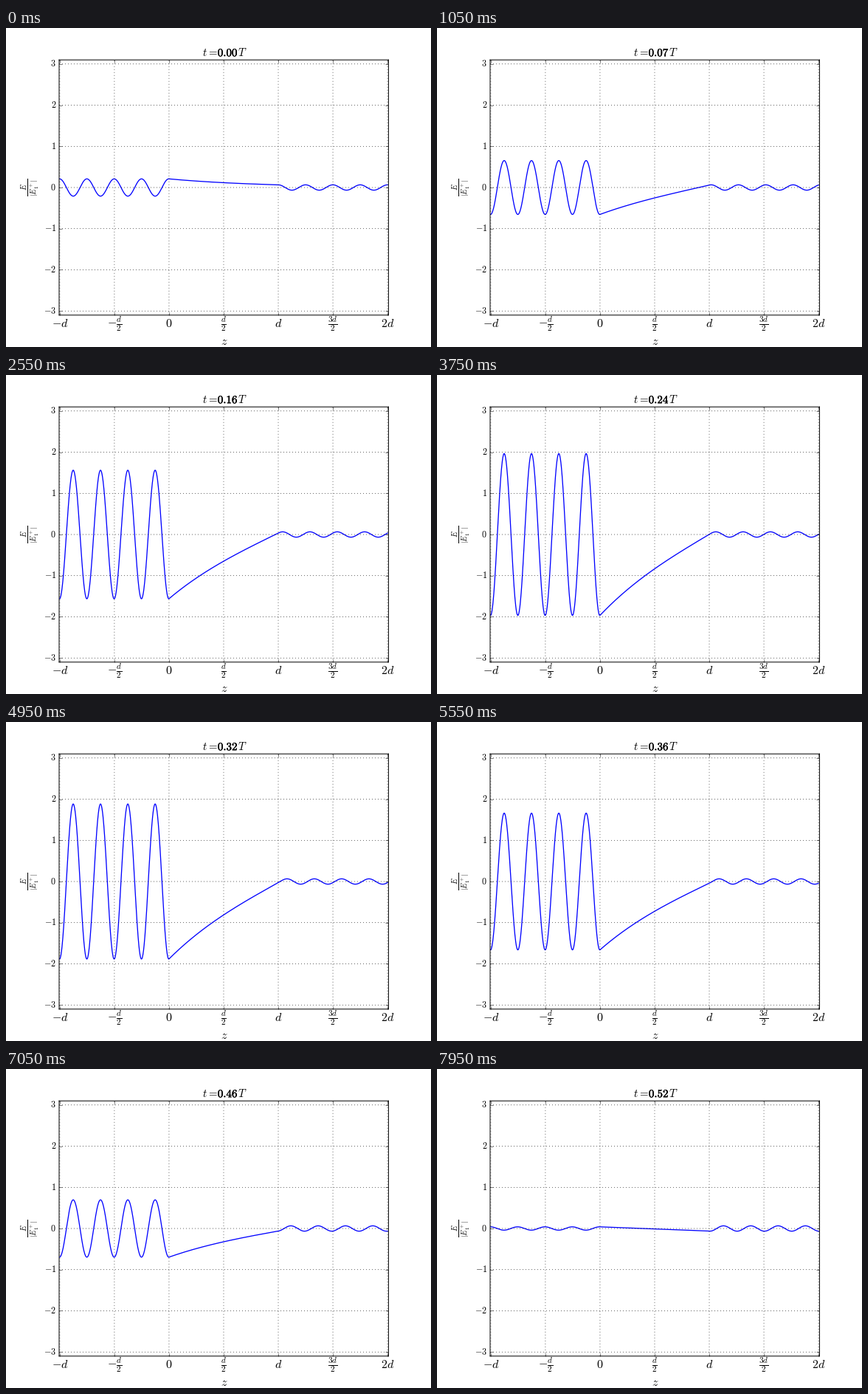
A matplotlib script that plays this animation: 576x432 px, repeating every 8 s.

```python
import numpy as np
import matplotlib.pyplot as plt
from matplotlib.animation import FuncAnimation
from matplotlib.patheffects import withStroke

W, H, DPI = 576, 432, 72
plt.style.use("classic")
plt.rcParams.update({
    "figure.facecolor": "white", "savefig.facecolor": "white",
    "figure.dpi": DPI, "savefig.dpi": DPI, "mathtext.fontset": "cm",
    "path.snap": False, "grid.linewidth": 0.6,
})

WAVE_NUMBER = 8 * np.pi      # four wavelengths per slab width d
DECAY = 1.17                 # attenuation across the slab
TRANSMITTED = 0.065
SURFACE = 1.98               # quadrature amplitude at z = 0

HOLD = 3                     # animation frames per time step
# Hundredths of a period; the full period shows up once, right after 0.10 T.
STEPS = [*range(11), 100, *range(11, 53)]

z_left = np.linspace(-1, 0, 400)
z_slab = np.linspace(0, 1, 150)
z_right = np.linspace(1, 2, 400)


def field(t):
    c, s = np.cos(2 * np.pi * t), np.sin(2 * np.pi * t)
    slab = (TRANSMITTED * c * np.exp(DECAY * (1 - z_slab))
            - SURFACE * s * np.sinh(DECAY * (1 - z_slab)) / np.sinh(DECAY))
    slope = DECAY * (SURFACE * s / np.tanh(DECAY)
                     - TRANSMITTED * c * np.exp(DECAY))
    left = (slab[0] * np.cos(WAVE_NUMBER * z_left)
            + slope / WAVE_NUMBER * np.sin(WAVE_NUMBER * z_left))
    right = TRANSMITTED * np.cos(WAVE_NUMBER * (z_right - 1) - 2 * np.pi * t)
    return np.concatenate([left, slab, right])


fig, ax = plt.subplots(figsize=(W / DPI, H / DPI))


def label(x, y, text, size, **kw):
    """Text at pixel coordinates measured from the top left."""
    kw = {"ha": "left", "va": "baseline", **kw}
    return fig.text(x / W, 1 - y / H, text, fontsize=size, **kw)


ax.set_xlim(-1.006, 2.009)
ax.set_ylim(-3.1, 3.1)
ax.set_xticks(np.arange(-1, 2.1, 0.5))
ax.set_xticklabels(
    ["$-d$", r"$-\frac{d}{2}$", "$0$", r"$\frac{d}{2}$", "$d$",
     r"$\frac{3d}{2}$", "$2d$"], fontsize=16, va="center")
ax.tick_params(axis="x", pad=11.7)
ax.set_yticks(range(-3, 4))
ax.set_yticklabels([f"${n}$" for n in range(-3, 4)], fontsize=12)
ax.grid(True)

label(295.4, 428.7, "$z$", 16, ha="center")
label(33.5, 216, r"$\frac{E}{|E_1^+|}$", 14.4, ha="center", va="center",
      rotation=90)
label(266.4, 38.2, r"$t\hspace{0.08}=$", 14.8)
clock = label(300.8, 38.2, "", 15, ha="center",
              path_effects=[withStroke(linewidth=0.4, foreground="k")])
label(313.7, 38.2, "$T$", 14.8)

z = np.concatenate([z_left, z_slab, z_right])
curve, = ax.plot(z, field(0), color="b", lw=1.3)


def update(i):
    t = STEPS[i // HOLD] / 100
    curve.set_ydata(field(t))
    clock.set_text(rf"$\mathbf{{{t:.2f}}}$")
    return curve, clock


anim = FuncAnimation(fig, update, frames=160, interval=50, repeat=True,
                     repeat_delay=0)
plt.show()
```
